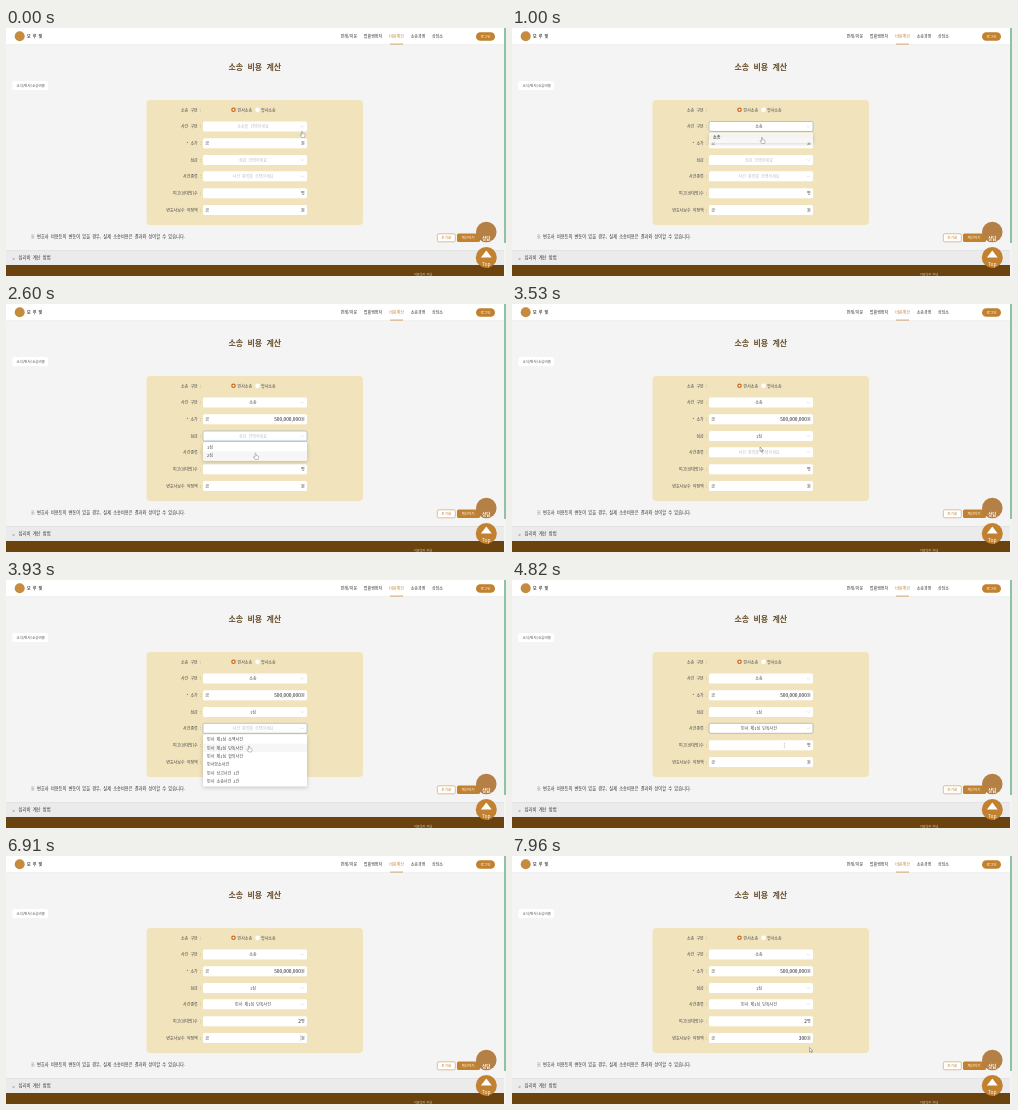
These frames come from a looping animation (500 px wide and 248 px high, 7.99 s). An HTML page:

```html
<!DOCTYPE html>
<html lang="ko">
<head>
<meta charset="utf-8">
<title>소송 비용 계산</title>
<style>
html, body { margin: 0; width: 100%; height: 100%; overflow: hidden; background: #f4f4f4; }
svg { display: block; width: 500px; height: 248px; }
text {
  font: 4px "Noto Sans CJK KR", "Noto Sans CJK", "Noto Sans", sans-serif;
  word-spacing: .25em; dominant-baseline: central; white-space: pre;
}
.menu { filter: drop-shadow(0 1px 2px #0003); }
</style>
</head>
<body>
<svg viewBox="0 0 500 248"><g id="page"></g><g id="live"></g></svg>
<script>
const LOOP = 7990, LEFT = 197, WIDTH = 104, ITEM = 8.35;
const BROWN = '#c1812f', INK = '#444', PALE = '#bdbdbd';
const ROWS = [82, 98.5, 115.2, 132, 148.3, 165.2, 182];
const LABELS = ['소송 구분 :', '사건 구분 :', '* 소가 :', '심급 :', '사건종류 :', '피고(상대방)수 :', '변호사보수 약정액 :'];

const SELECTS = [
  { row: 1, hint: '소송을 선택하세요', items: ['소송'], pick: 0, open: 580, click: 910, shut: 1190, blur: 1220 },
  { row: 3, hint: '심급 선택하세요', items: ['1심', '2심'], pick: 0, open: 2420, click: 2910, shut: 3200, blur: 3250 },
  { row: 4, hint: '사건 종류를 선택하세요', pick: 1, open: 3700, click: 4340, shut: 4440, blur: 5000,
    items: ['민사 제1심 소액사건', '민사 제1심 단독사건', '민사 제1심 합의사건', '민사항소사건', '민사 상고사건 1건', '민사 소송사건 2건'] }
];
const INPUTS = [
  { row: 2, unit: '원', digits: '500000000', from: 1500, to: 2010 },
  { row: 5, unit: '명', digits: '2', from: 5500, to: 5740 },
  { row: 6, unit: '원', digits: '300', from: 7400, to: 7650 }
];
// time, x, y of the pointer tip
const PATH = [
  [0, 296, 103], [100, 296, 103], [500, 258, 98], [650, 252, 99], [800, 250, 109], [1220, 250, 109],
  [1480, 262, 115], [2110, 262, 115], [2400, 250, 132], [2580, 249.5, 149], [2680, 249.5, 149],
  [2790, 248, 143], [3530, 248, 143], [3700, 245, 149], [3900, 243, 165.5], [4580, 243, 165.5],
  [5020, 294.5, 165.5], [6180, 294.5, 165.5], [6480, 294.5, 182], [7840, 294.5, 182], [7950, 297.5, 191.5]
];

const clamp = v => Math.max(0, Math.min(1, v));
const ease = v => v * v * (3 - 2 * v);
const rect = (x, y, w, h, fill, r = 0, more = '') =>
  `<rect x="${x}" y="${y}" width="${w}" height="${h}" rx="${r}" fill="${fill}" ${more}/>`;
const circle = (x, y, r, fill) => `<circle cx="${x}" cy="${y}" r="${r}" fill="${fill}"/>`;
const text = (s, x, y, { fill = INK, size = 4, anchor = 'start', weight = 400 } = {}) =>
  `<text x="${x}" y="${y - .4}" fill="${fill}" text-anchor="${anchor}" style="font-size:${size}px;font-weight:${weight}">${s}</text>`;
const field = (y, stroke = 'none') =>
  rect(LEFT, y - 5, WIDTH, 10, '#fff', 1.5, `stroke="${stroke}" stroke-width=".6"`);
const middle = { anchor: 'middle' };

function drawPage() {
  const nav = [['판례/자문', 343], ['법률행정처', 367], ['비용계산', 390.5], ['소송과정', 412], ['상담소', 431.5]];
  return [
    rect(0, 0, 500, 248, '#f4f4f4'),
    rect(0, 0, 500, 16.5, '#fff'),
    rect(0, 16.2, 500, .5, '#e8e8e8'),
    circle(13.7, 8.3, 5, '#c58b3f'),
    text('모 루 빛', 21, 8, { weight: 700 }),
    ...nav.map(([s, x], i) => text(s, x, 8.5, { ...middle, fill: i == 2 ? BROWN : '#333' })),
    rect(384, 15.7, 13, .7, BROWN),
    rect(470, 4.2, 19, 8.6, BROWN, 4.3),
    text('로그인', 479.5, 8.7, { ...middle, fill: '#fff', size: 3.6 }),
    text('소송 비용 계산', 248.8, 39, { ...middle, fill: '#674f2c', size: 8, weight: 700 }),
    rect(6.5, 53, 35.5, 9, '#fff', 1.5),
    text('소식/민사/소송비용', 10.5, 57.9, { size: 3.5 }),
    rect(140.5, 72, 216.5, 125, '#f1e4bd', 4),
    ...LABELS.map((s, i) => text(s, 195, ROWS[i] + .3, { anchor: 'end' })),
    circle(227.5, 81.8, 2.3, '#c8691e'), circle(227.5, 81.8, 1, '#fff'),
    text('민사소송', 231.5, 82.2),
    circle(251.5, 81.8, 2.2, '#fff'),
    text('형사소송', 255, 82.2),
    text('※ 변호사 비용등의 변동이 있을 경우, 실제 소송비용은 결과와 상이할 수 있습니다.', 24.7, 208, { size: 4.2, fill: '#2a2a2a' }),
    rect(431.3, 205.8, 18, 8, '#fff', 1.5, `stroke="${BROWN}" stroke-width=".5"`),
    text('초기화', 440.3, 210, { ...middle, fill: BROWN, size: 3.6 }),
    rect(451, 205.5, 23, 8.6, BROWN, 1.5),
    text('계산하기', 462, 210, { ...middle, fill: '#fff', size: 3.6 }),
    rect(0, 222, 500, 15.5, '#ebebeb'),
    rect(0, 222, 500, .6, '#dcdcdc'),
    text('&gt;', 6.5, 230),
    text('심리비 계산 방법', 12.5, 229.8, { size: 4.3, fill: '#333' }),
    rect(0, 237, 500, 11, '#6b430f'),
    text('이용약관 안내', 417, 247.3, { ...middle, fill: '#e4d6c0', size: 3 }),
    rect(498, 0, 2, 248, '#f4f4f4'),
    rect(498, 0, 2, 215, '#8fc2a5'),
    circle(480.3, 204, 10.3, '#b58046'),
    text('상담', 480.3, 210.5, { ...middle, fill: '#fff', size: 4.4, weight: 700 }),
    circle(480.3, 229.4, 10.5, BROWN),
    '<path d="M480.3 222.6l5.4 6.9h-10.8z" fill="#fff"/>',
    text('Top', 480.3, 235.8, { ...middle, fill: '#fff', size: 5 })
  ].join('');
}

function pointerAt(t) {
  const i = PATH.findIndex(p => p[0] > t);
  if (i < 0) return PATH.at(-1).slice(1);
  const [t0, x0, y0] = PATH[i - 1], [t1, x1, y1] = PATH[i];
  const k = ease((t - t0) / (t1 - t0));
  return [x0 + (x1 - x0) * k, y0 + (y1 - y0) * k];
}

function drawSelect({ row, hint, items, pick, open, click, shut, blur }, t) {
  const y = ROWS[row], chosen = t >= click;
  const stroke = t < open || t > blur ? 'none' : t > shut ? '#999' : '#8aa5c4';
  return field(y, stroke) +
    text(chosen ? items[pick] : hint, 247, y + .3, { ...middle, fill: chosen ? INK : PALE }) +
    `<path d="M294.8 ${y - .7}l1.5 1.5 1.5-1.5" fill="none" stroke="#bbb" stroke-width=".4"/>`;
}

function drawInput({ row, unit, digits, from, to }, t) {
  const y = ROWS[row];
  const count = t < from ? 0 : 1 + Math.floor(clamp((t - from) / (to - from)) * (digits.length - 1));
  const value = count ? Number(digits.slice(0, count)).toLocaleString('en') : '';
  return field(y) + (unit == '원' ? text('금', 199.3, y + .3) : '') +
    text(value, 294.8, y, { anchor: 'end', size: 4.8, fill: '#222', weight: 500 }) +
    text(unit, 295, y + .3);
}

function drawMenu({ row, items, open, click, shut }, t, [, py]) {
  const shown = clamp((t - open) / 120) * (1 - clamp((t - click) / (shut - click)) ** 2);
  if (!shown) return '';
  const top = ROWS[row] + 6;
  const active = Math.max(0, Math.min(items.length - 1, Math.floor((py - top - 1) / ITEM)));
  return `<g class="menu" opacity="${shown}">` +
    rect(LEFT, top, WIDTH, items.length * ITEM + 2, '#fff', 1.5) +
    rect(LEFT, top + 1 + active * ITEM, WIDTH, ITEM, '#f6f6f6') +
    items.map((s, i) => text(s, 201, top + 1.2 + (i + .5) * ITEM, { weight: items.length == 1 ? 700 : 400 })).join('') +
    '</g>';
}

function drawPointer([x, y], t) {
  const inside = ({ row }) => x > LEFT && x < LEFT + WIDTH && Math.abs(y - ROWS[row]) <= 5;
  const menuOpen = SELECTS.some(s => t > s.open && t < s.shut);
  const shape = menuOpen || SELECTS.some(inside)
    ? '<path d="M-.5 .5q.6-.8 1 0v2l2 .5q.8.2.6 1.2l-.5 2.3h-3l-1.7-2.6q.2-.8 1.6.3z" fill="#fff" stroke="#666" stroke-width=".4"/>'
    : INPUTS.some(inside)
      ? '<path d="M-.8-2.3h1.6M0-2.3v4.6M-.8 2.3h1.6" stroke="#888" stroke-width=".25"/>'
      : '<path d="M0 0v4.6l1.1-1 .8 1.8.8-.4-.8-1.7h1.5z" fill="#fff" stroke="#444" stroke-width=".4"/>';
  return `<g transform="translate(${x} ${y})">${shape}</g>`;
}

const live = document.getElementById('live');
document.getElementById('page').innerHTML = drawPage();

function frame() {
  const t = performance.now() % LOOP, pointer = pointerAt(t);
  live.innerHTML = [
    ...SELECTS.map(s => drawSelect(s, t)),
    ...INPUTS.map(s => drawInput(s, t)),
    ...SELECTS.map(s => drawMenu(s, t, pointer)),
    drawPointer(pointer, t)
  ].join('');
  requestAnimationFrame(frame);
}
frame();
</script>
</body>
</html>
```
